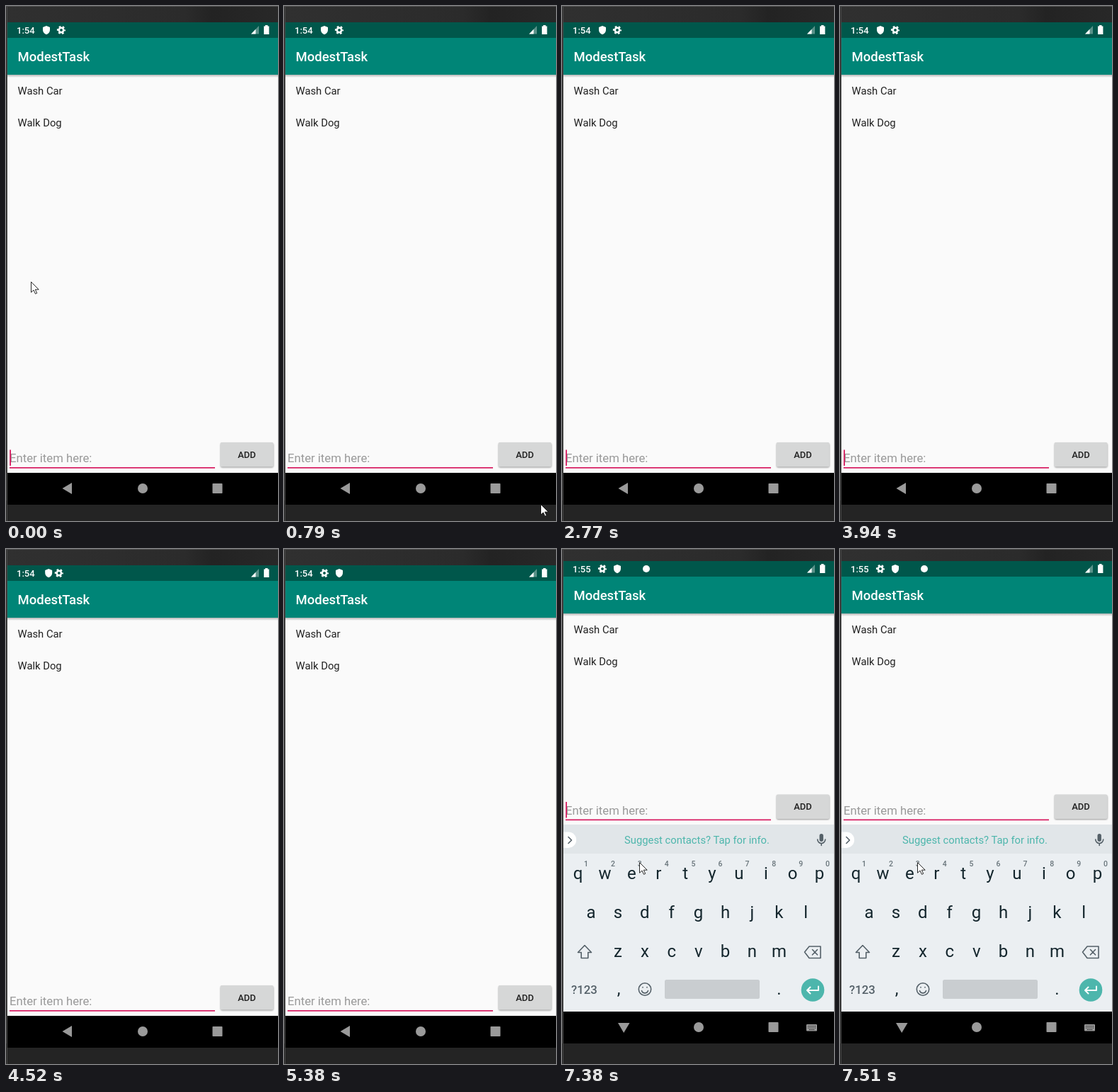
An HTML page that plays this animation: 384 px wide and 727 px high, repeating every 8000 ms.

```html
<!DOCTYPE html>
<html lang="en">
<head>
<meta charset="utf-8">
<title>Todo list</title>
<style>
  html, body { margin: 0; width: 100%; height: 100%; overflow: hidden; background: #272727; }
  svg { display: block; width: 100%; height: 100%; }
  text { font-family: Roboto, sans-serif; white-space: pre; }
  .medium { font-weight: 500; }
  .line { fill: none; stroke: #546068; stroke-width: 1.6; stroke-linejoin: round; stroke-linecap: round; }
  .letter { font-size: 24px; fill: #14262d; text-anchor: middle; }
  .digit { font-size: 10.5px; fill: #68747a; text-anchor: middle; font-weight: 500; }
</style>
</head>
<body>
<svg viewBox="0 0 384 727">
  <defs>
    <linearGradient id="drop" x2="0" y2="1">
      <stop stop-opacity=".28"/><stop offset="1" stop-opacity="0"/>
    </linearGradient>
    <linearGradient id="desk">
      <stop stop-color="#303030"/><stop offset=".66" stop-color="#2b2b2b"/>
      <stop offset=".76" stop-color="#232323"/><stop offset="1" stop-color="#282828"/>
    </linearGradient>
    <filter id="soft" x="-10%" y="-20%" width="120%" height="150%"><feGaussianBlur stdDeviation="1.1"/></filter>
  </defs>

  <rect width="384" height="727" fill="url(#desk)"/>
  <rect width="384" height="1" fill="#505050"/>
  <rect y="698" width="384" height="29" fill="#242424"/>
  <rect x="1" width="1" height="727" fill="#484848"/>

  <g id="phone">
    <rect x="2" y="97" width="382" height="562" fill="#fafafa"/>
    <rect x="2" y="97" width="382" height="4" fill="url(#drop)"/>
    <rect x="2" y="23" width="382" height="22" fill="#00574b"/>
    <rect x="2" y="45" width="382" height="52" fill="#008577"/>
    <rect x="2" y="659" width="382" height="45"/>

    <g fill="#fff">
      <text id="clock" class="medium" x="15" y="39" font-size="13"></text>
      <path id="shield" d="M0-6 5-4V0C5 3 3 5.2 0 6.2-3 5.2-5 3-5 0V-4Z"/>
      <g id="gear">
        <circle r="3.2" fill="none" stroke="#fff" stroke-width="2.6"/>
        <circle r="5.1" fill="none" stroke="#fff" stroke-width="2" stroke-dasharray="2.67" stroke-dashoffset="1.33"/>
      </g>
      <circle id="notice" cx="119" cy="34" r="5"/>
      <path d="M346 39.500 357 28V39.500Z" opacity=".35"/>
      <path d="M346 39.500 352.500 32.700V39.500Z"/>
      <path d="M364 28.500h2v-1.500h3.500v1.500h1.900V40H364Z"/>
      <text class="medium" x="16.500" y="78" font-size="18.500">ModestTask</text>
    </g>

    <g font-size="14.800" fill="#212121">
      <text x="16.500" y="125">Wash Car</text>
      <text x="16.500" y="170">Walk Dog</text>
    </g>

    <g fill="#9a9a9a">
      <path id="back"/>
      <circle cx="193" cy="681" r="7"/>
      <rect x="291.500" y="674" width="14" height="14" rx=".8"/>
      <g id="switcher">
        <rect x="345" y="677" width="15" height="9.500" rx="1"/>
        <path d="M347 679.500h11M347 682h11M349 684.500h7" stroke="#000" stroke-width="1.100" stroke-dasharray="1 1"/>
      </g>
    </g>
  </g>

  <g id="keyboard">
    <rect x="2" y="389" width="382" height="264" fill="#ebeff2"/>
    <rect x="2" y="389" width="382" height="41" fill="#e1e6e9"/>
    <path d="M2 399.500H9a11.200 11.200 0 0 1 0 22.400H2Z" fill="#fff"/>
    <path d="M9 406.500 13.500 411 9 415.500" class="line" stroke-width="1.800"/>
    <text x="88" y="416" font-size="14.800" fill="#4db6ac">Suggest contacts? Tap for info.</text>
    <rect x="363.500" y="402" width="5.400" height="11" rx="2.700" fill="#546068"/>
    <path d="M360.700 410a5.500 5.500 0 0 0 11 0M366.200 415.500V418.500" class="line"/>
    <g id="keys"></g>
    <path d="M32 559.500 41.500 569.500H36.800V577.500H27.200V569.500H22.500Z" class="line"/>
    <path d="M342.500 569 349 561H365V577.500H349ZM353.500 565.500 360.500 572.800M360.500 565.500 353.500 572.800" class="line"/>
    <text class="medium" x="13" y="628" font-size="16.800" fill="#546068">?123</text>
    <circle cx="117" cy="621.500" r="8.700" class="line"/>
    <path d="M112.500 623.500a4.700 4.700 0 0 0 9 0M114 618.500v.5M120 618.500v.5" class="line"/>
    <rect x="145" y="608" width="134" height="27" rx="2.500" fill="#c9cdd0"/>
    <circle cx="354" cy="622.500" r="16.300" fill="#4db6ac"/>
    <path d="M362 617.500V623H346.500M350.500 618.500 346 623 350.500 627.500" class="line" style="stroke:#fff;stroke-width:2"/>
  </g>

  <g id="entry">
    <text x="5" y="644" font-size="16.700" fill="#999">Enter item here:</text>
    <rect x="5" y="651" width="290" height="1.700" fill="#d81b60"/>
    <rect id="caret" x="5.200" y="626.500" width="1.800" height="22.500" fill="#d81b60"/>
    <rect x="303" y="617.500" width="74.500" height="34" rx="2" opacity=".4" filter="url(#soft)"/>
    <rect x="302.500" y="616" width="75" height="34.500" rx="2" fill="#d6d7d7"/>
    <text class="medium" x="340" y="637.500" font-size="13" fill="#212121" text-anchor="middle">ADD</text>
  </g>

  <path id="pointer" d="M.5.5V15.200L4 12 6.500 17.300 8.700 16.300 6.300 11.200H11.200Z" fill="#fff" stroke="#111" stroke-width=".9"/>
</svg>

<script>
const LOOP = 8000, KEYBOARD_OPENS = 7380;
const $ = id => document.getElementById(id);
const show = (id, on) => $(id).setAttribute('visibility', on ? 'visible' : 'hidden');
const move = (id, x, y) => $(id).setAttribute('transform', `translate(${x} ${y})`);

// Times at which the text caret flips; it is visible at the start.
const caretFlips = [640, 1210, 2050, 2770, 3350, 3940, 4520, 4650, 5220, 5810, 6380, 6960, 7510];

// [time, x, y] held until the next entry; no position means off stage.
const pointerStops = [
  [0, 35, 389], [120, 36, 383], [280, 85, 430], [440, 190, 535], [610, 295, 640],
  [790, 362, 703], [940, 373, 707], [1060],
  [1210, 35, 413], [1350, 32, 415], [1490, 30, 416], [1630, 28, 416],
  [1910, 65, 450], [2050, 170, 540], [2200, 285, 640], [2340, 371, 711], [2490],
  [5220, 190, 711], [5380], [KEYBOARD_OPENS, 109, 442]
];
const swapTimes = [4380, 4520, 4650, 4790, 4950];

function buildKeys() {
  const add = (cls, x, y, label) =>
    `<text class="${cls}" x="${x}" y="${y}">${label}</text>`;
  const row = (letters, x, y) =>
    [...letters].map((c, i) => add('letter', x + i * 37.9, y, c)).join('');
  $('keys').innerHTML =
    row('qwertyuiop', 22.5, 466) + row('asdfghjkl', 41, 521) + row('zxcvbnm', 79, 576) +
    [...'1234567890'].map((c, i) => add('digit', 34 + i * 37.9, 448, c)).join('') +
    add('letter', 80, 629, ',') + add('letter', 306.5, 629, '.');
}

function swapOffset(t) {
  const held = swapTimes.filter(s => s <= t).pop() ?? 4380;
  const p = (held - 4380) / 570;
  return 21 * p * p * (3 - 2 * p);
}

function draw(t) {
  const open = t >= KEYBOARD_OPENS;
  const swap = swapOffset(t);
  move('phone', 0, open ? -6 : 0);
  move('entry', 0, open ? -269.5 : 0);
  for (const id of ['keyboard', 'notice', 'switcher']) show(id, open);
  $('clock').textContent = open ? '1:55' : '1:54';
  $('back').setAttribute('d', open ? 'M79 675H95.500L87.200 689Z' : 'M79.500 681 93 673V689Z');
  move('shield', 57 + swap, 34);
  move('gear', 78 - swap, 34);
  show('caret', caretFlips.filter(s => s <= t).length % 2 === 0);

  const [, x, y] = pointerStops.filter(s => s[0] <= t).pop();
  show('pointer', x !== undefined);
  if (x !== undefined) move('pointer', x, y);
}

function tick() {
  draw(performance.now() % LOOP);
  requestAnimationFrame(tick);
}

buildKeys();
tick();
</script>
</body>
</html>
```
